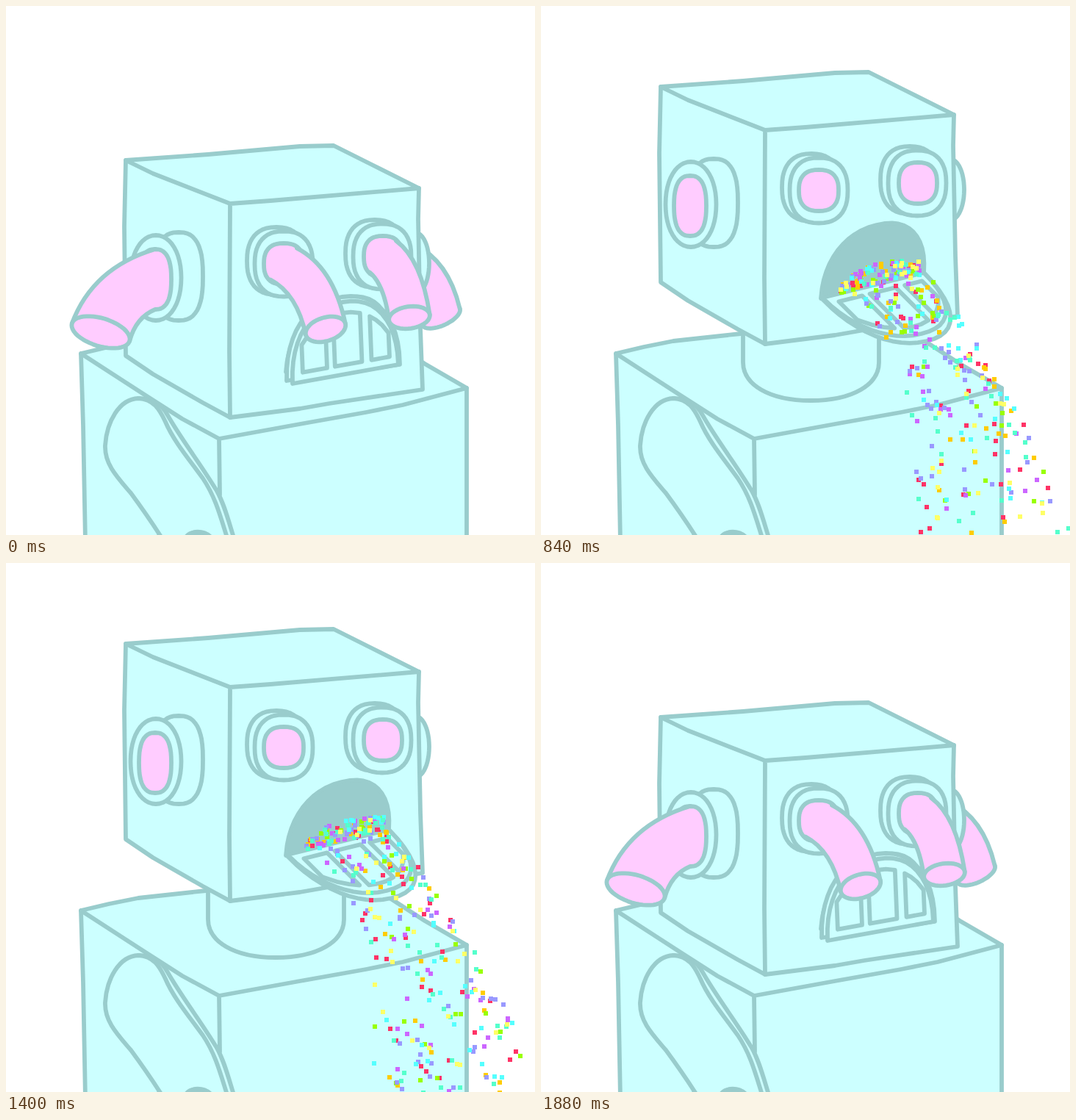
These frames come from a looping animation (720x720 px, 2.16 s). An HTML page:

```html
<!DOCTYPE html>
<html lang="en">
<head>
<meta charset="utf-8">
<title>Robot</title>
<style>
  html, body { margin: 0; width: 100%; height: 100%; overflow: hidden; background: #fff; }
  svg { display: block; width: 100vw; height: 100vh; }
  .line { fill: none; }
  .skin { fill: #cff; }
  .pink { fill: #fcf; }
  .dark { fill: #9cc; }
  .bare { stroke: none; }
</style>
</head>
<body>
<svg id="stage" viewBox="0 0 720 720" stroke="#9cc" stroke-width="5.8" stroke-linejoin="round" stroke-linecap="round"></svg>
<script>
const LOOP = 2160, STEP = 40;
const stage = document.getElementById('stage');

function add(parent, tag, cls, d) {
  const el = document.createElementNS('http://www.w3.org/2000/svg', tag);
  if (cls) el.setAttribute('class', cls);
  if (d) el.setAttribute('d', d);
  parent.appendChild(el);
  return el;
}
const path = (parent, cls, d) => add(parent, 'path', cls, d);
const setD = (el, d) => el.setAttribute('d', d);
const mix = (a, b, k) => a + (b - a) * k;
const clamp = v => Math.max(0, Math.min(1, v));
const poly = pts => 'M' + pts.map(p => p[0].toFixed(1) + ' ' + p[1].toFixed(1)).join('L') + 'Z';

// Point on a unit circle, squarer as n grows
function unit(a, n) {
  const bend = v => Math.sign(v) * Math.abs(v) ** (2 / n);
  return [bend(Math.cos(a)), bend(Math.sin(a))];
}

function oval(cx, cy, rx, ry, n = 2, deg = 0) {
  const r = deg * Math.PI / 180, co = Math.cos(r), si = Math.sin(r);
  return poly(Array.from({ length: 48 }, (_, i) => {
    const [x, y] = unit(i * Math.PI / 24, n);
    return [cx + x * rx * co - y * ry * si, cy + x * rx * si + y * ry * co];
  }));
}

// Torso, arm and neck
path(stage, 'skin', 'M102 473L140 464L180 456L272 446L462 417L530 461L570 487L627 520V730H108L105 570Z');
path(stage, 'line', 'M102 473L190 530L240 562L290 589L400 569L490 553L540 543L627 520M290 589L291 665');
path(stage, 'skin', 'M180 534C203 535 212 543 220 557C240 592 264 622 287 660C298 680 303 702 312 730H210Z');
path(stage, 'skin', 'M212 724C198 702 184 682 170 663C152 642 134 624 135 598C137 566 154 535 180 534C201 535 209 549 217 566C228 592 250 618 268 643C286 670 292 696 303 730');
path(stage, 'dark', 'M244 724C251 713 270 713 280 724Z');
path(stage, 'skin', 'M275 440V485C275 515 310 537 367 537C425 537 460 515 460 485V420');

const head = add(stage, 'g');

// A bendy pipe: its tip swings from the base past a control point to the end
class Tube {
  constructor(base, via, end, tilt, long, flat, fromBehind) {
    Object.assign(this, { base, via, end, tilt, long, flat });
    if (!fromBehind) path(head, 'pink', oval(...base, flat[0], long, 2.5));
    this.g = add(head, 'g');
    if (fromBehind) this.tip = path(this.g, 'pink');
    this.fill = path(this.g, 'pink bare');
    this.edge = path(this.g, 'line');
    if (!fromBehind) this.tip = path(this.g, 'pink');
  }
  rim([x, y], deg, side) {
    const a = deg * Math.PI / 180;
    return [x + side * this.long * Math.cos(a), y + side * this.long * Math.sin(a)];
  }
  pose(e) {
    this.g.setAttribute('display', e < .02 ? 'none' : 'inline');
    const s = e * e, r = 1 - s;
    const c = this.base.map((b, i) => r * r * b + 2 * r * s * this.via[i] + s * s * this.end[i]);
    const deg = mix(...this.tilt, (e + s) / 2);
    const flat = mix(...this.flat, clamp((e - .3) / .36));
    const bend = .5 - .25 * e;
    const [one, two] = [-1, 1].map(side => {
      const b = this.rim(this.base, this.tilt[0], side), t = this.rim(c, deg, side);
      return { b, t, q: [mix(t[0], b[0], bend), mix(b[1], t[1], bend)] };
    });
    const out = `M${one.b}Q${one.q} ${one.t}`, back = `Q${two.q} ${two.b}`;
    setD(this.fill, `${out}L${two.t}${back}Z`);
    setD(this.edge, `${out}M${two.t}${back}`);
    setD(this.tip, oval(...c, this.long, flat, 2, deg));
  }
}

const farEar = new Tube([556, 353], [644, 411], [592, 423], [-90, -24], 28, [16, 12], true);
path(head, 'skin', oval(558, 350, 18, 41));

// Box
path(head, 'skin', 'M163 210L275 202L400 191L446 190L500 217L562 248L561 290L564 440L567 522L440 541L400 548L305 560L268 540L200 501L163 476L161 300Z');
path(head, 'line', 'M163 210L200 228L305 269L360 265L562 248M305 269L304 470L305 560');

// Near ear
path(head, 'skin', oval(235, 368, 33, 60, 2.6));
path(head, 'skin', oval(204, 370, 34.5, 58, 2.1));
const nearEar = new Tube([203, 372], [83, 411], [129, 444], [90, 17], 41, [22, 19]);

// Eye sockets: a back ring and a front ring each
for (const [x, y] of [[378, 351], [512, 341]]) {
  path(head, 'skin', oval(x - 10, y - 4, 40, 46, 2.4));
  path(head, 'skin', oval(x, y, 39.5, 44.5, 2.4));
}

// Mouth: half discs, placed by hinge middle, half hinge and height vectors
const place = ([mx, my, hx, hy, ux, uy]) => ([u, v]) => [mx + u * hx + v * ux, my + u * hy + v * uy];
const arch = Array.from({ length: 25 }, (_, i) => unit(Math.PI * (1 - i / 24), 2.25));
const slots = [[-.8, -.34], [-.19, .32], [.5, .84]].map(([a, b]) => {
  const top = [0, 1, 2, 3].map(i => mix(a, b, i / 3)).map(u => [u, .85 * Math.sqrt(1 - u * u)]);
  return [[a, .13], ...top, [b, .13]];
});
const rim = { shut: [459, 499, 77, -11, -2, -103], open: [453, 482, 70, -17, 72, 74] };
const plate = { shut: [462, 501, 72, -13, -4, -98], open: [452, 480, 69, -17, 66, 66] };
path(head, 'dark', poly(arch.map(place([451, 481, 70, -17, 6, -83]))));
const mouth = [[rim, arch], [plate, arch], ...slots.map(s => [plate, s])]
  .map(([frame, pts]) => ({ frame, pts, el: path(head, 'skin') }));

function poseMouth(open) {
  for (const { frame, pts, el } of mouth) {
    const at = frame.shut.map((v, i) => mix(v, frame.open[i], open));
    setD(el, poly(pts.map(place(at))));
  }
}

const leftEye = new Tube([378, 351], [478, 478], [435, 440], [-50, -17], 28, [27, 16]);
const rightEye = new Tube([513, 341], [581, 455], [549, 424], [-50, -8], 28, [26, 15]);
const tubes = [farEar, nearEar, leftEye, rightEye];

// Confetti
let seed = 7;
function rand() {
  seed = seed + 0x6D2B79F5 | 0;
  let r = Math.imul(seed ^ seed >>> 15, 1 | seed);
  r = r + Math.imul(r ^ r >>> 7, 61 | r) ^ r;
  return ((r ^ r >>> 14) >>> 0) / 2 ** 32;
}
const COLORS = ['#ff3366', '#ffcc00', '#99ff00', '#cc66ff', '#9999ff', '#55ffff', '#55ffcc', '#ffff66'];
const SPRAY_ON = 480, CYCLE = 320, WAIT = 1.5, FLOOR = 724;
const layers = COLORS.map(c => {
  const el = path(stage, 'bare');
  el.setAttribute('fill', c);
  return el;
});
const bits = Array.from({ length: 440 }, () => {
  const u = rand();
  return {
    u,
    color: Math.floor(rand() * COLORS.length),
    birth: rand() * CYCLE,
    stop: 1360 + rand() * 160,
    x: 408 + u * 107,
    y: mix(346 + 36 * (1 - u) ** 3, 390 - 25 * u, rand() ** 1.5),
    speed: 48 + rand() * 16,
    drift: rand() * 30 - 15
  };
});

// Each bit rests on the lip, then drops and fans out
function drawBits(t) {
  const d = COLORS.map(() => '');
  for (const b of bits) {
    const age = ((t - b.birth) % CYCLE + CYCLE) % CYCLE, born = t - age;
    if (born < SPRAY_ON || born > b.stop) continue;
    const y = b.y + b.speed * Math.max(0, age / STEP - WAIT) ** 1.2;
    if (y > FLOOR) continue;
    const k = (y - b.y) / (FLOOR - b.y);
    const x = b.x + (105 + 90 * b.u) * (1 - (1 - k) ** (3.6 - 2.2 * b.u)) + b.drift * Math.sqrt(k);
    d[b.color] += `M${Math.round(x) - 3} ${Math.round(y) - 3}h6v6h-6z`;
  }
  layers.forEach((el, i) => setD(el, d[i]));
}

function lift(t) {
  if (t < 400) return 0;
  if (t < 1520) return Math.min(1, .34 + .0917 * (t - 400) / STEP);
  return clamp(1 - (t - 1480) / 400);
}

function gape(t) {
  return t < 1000 ? clamp((t - 400) / 120) : clamp((1600 - t) / 120);
}

function draw(now) {
  const t = Math.floor(now % LOOP / STEP) * STEP;
  const h = lift(t);
  head.setAttribute('transform', `translate(0 ${(-100 * h).toFixed(1)})`);
  tubes.forEach(tube => tube.pose(1 - h));
  poseMouth(gape(t));
  drawBits(t);
}

function tick(now) {
  draw(now);
  requestAnimationFrame(tick);
}
draw(0);
requestAnimationFrame(tick);
</script>
</body>
</html>
```
